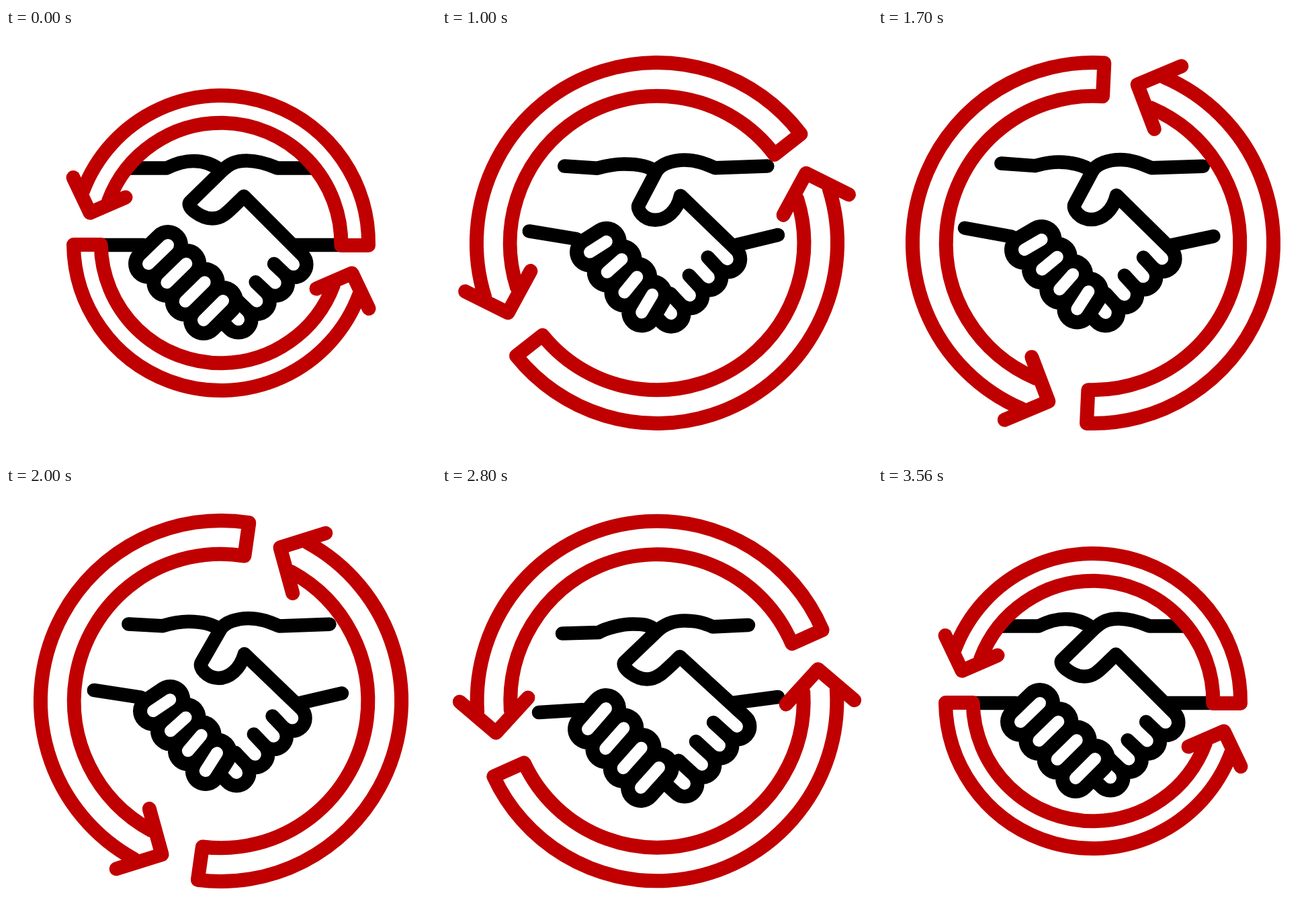
An HTML page with a canvas for the animation above (3.6 s loop, 640 by 640 pixels).

```html
<!DOCTYPE html>
<html lang="en">
<head>
<meta charset="utf-8">
<title>Handshake</title>
<style>
  html, body { margin: 0; width: 100%; height: 100%; overflow: hidden; background: #fff; }
  canvas { display: block; }
</style>
</head>
<body>
<canvas id="stage" width="640" height="640"></canvas>
<script>
const ctx = document.getElementById('stage').getContext('2d');
const LOOP = 3600, RED = '#c00000', RAD = Math.PI / 180;

// Each joint: resting, lifted and dropped position.
const leftHand = {
  leftCap:    [[182, 208.5], [184, 199], [179, 219.5]],
  leftBend:   [[239, 208.5], [235, 203], [233, 218]],
  leftTop:    [[279, 198], [268, 198], [284, 205.5]],
  cuffLeft:   [[141, 323], [128, 294], [144, 337]],
  wristLeft:  [[205, 323], [198, 308], [209, 333]],
  lowFirst:   [[212, 351], [217, 327], [217, 362]],
  lowLast:    [[294, 435], [296, 415], [296, 449]],
  highFirst:  [[241, 323], [243, 313], [244, 331]],
  highLast:   [[323, 406], [313, 389], [323, 419]]
};
const rightHand = {
  cross:      [[321, 213], [319, 213], [320, 216]],
  rightTop:   [[358, 197.5], [360, 195.5], [361, 200.5]],
  rightBend:  [[404, 208.5], [407, 208], [403, 209.5]],
  rightCap:   [[458, 208.5], [485, 206], [456, 207]],
  thumbSide:  [[274, 259], [293.5, 262], [272, 262]],
  thumbTip:   [[307, 283.5], [318, 284.5], [305, 287.5]],
  thumbCurve: [[330, 274], [350, 272], [330, 277]],
  knuckle:    [[354, 250.5], [355, 248.5], [354, 254]],
  tipFirst:   [[428, 352], [421, 342], [439, 358]],
  tipLast:    [[346, 434], [336, 422], [361, 443]],
  gap:        [[399, 351], [394, 341], [404, 352]],
  wristRight: [[430, 323], [433, 324], [432, 323]],
  cuffRight:  [[497, 323], [499, 311], [500, 314]]
};

// Keys are [time, value]; spin and grow run forwards, then mirrored.
const spin = [[120, 0], [500, 7.4], [660, 14.4], [800, 24.2], [1000, 38], [1380, 66.5], [1600, 82], [1800, 90]];
const grow = [[120, 0], [340, .12], [500, .5], [660, .88], [860, 1]];
const lift = [[120, 0], [500, .5], [1000, 1], [1380, 1], [2000, .9], [2800, 0]];
const dropLeft = [[120, 0], [1000, .6], [1380, 0], [2000, .5], [2800, 1], [3500, 0]];
const dropRight = [[120, 0], [1000, .33], [1380, 0], [2000, .4], [2800, 1], [3500, 0]];

// Smooth interpolation that never overshoots its keys.
function track(keys, t) {
  const last = keys.length - 1;
  if (t <= keys[0][0]) return keys[0][1];
  if (t >= keys[last][0]) return keys[last][1];
  const slope = i => (keys[i + 1][1] - keys[i][1]) / (keys[i + 1][0] - keys[i][0]);
  const tangent = i => {
    if (i === 0 || i === last) return 0;
    const a = slope(i - 1), b = slope(i);
    return a * b > 0 ? 2 * a * b / (a + b) : 0;
  };
  const i = keys.findIndex(k => k[0] > t) - 1;
  const span = keys[i + 1][0] - keys[i][0], u = (t - keys[i][0]) / span, v = 1 - u;
  return keys[i][1] * v * v * (1 + 2 * u) + keys[i + 1][1] * u * u * (3 - 2 * u)
    + span * u * v * (tangent(i) * v - tangent(i + 1) * u);
}

const mix = (a, b, k) => [a[0] + (b[0] - a[0]) * k, a[1] + (b[1] - a[1]) * k];
const shift = (p, x, y) => [p[0] + x, p[1] + y];
const curve = (a, b, c) => ctx.bezierCurveTo(...a, ...b, ...c);

function stroke(color, width, draw) {
  ctx.strokeStyle = color;
  ctx.lineWidth = width;
  ctx.beginPath();
  draw();
  ctx.stroke();
}

function line(...points) {
  points.forEach((p, i) => i ? ctx.lineTo(...p) : ctx.moveTo(...p));
}

function pose(joints, up, down) {
  const blend = ([rest, high, low]) =>
    rest.map((v, i) => v + (high[i] - v) * up + (low[i] - v) * down);
  return Object.fromEntries(Object.entries(joints).map(([name, places]) => [name, blend(places)]));
}

function drawHands(t) {
  const up = track(lift, t);
  const p = {
    ...pose(leftHand, up, track(dropLeft, t)),
    ...pose(rightHand, up, track(dropRight, t))
  };
  const step = [(p.tipLast[0] - p.tipFirst[0]) / 3, (p.tipLast[1] - p.tipFirst[1]) / 3];
  const along = (point, n) => shift(point, step[0] * n, step[1] * n);

  stroke('#000', 20.5, () => {
    line(p.leftCap, p.leftBend);
    curve(shift(p.leftBend, 12, (p.leftTop[1] - p.leftBend[1]) * .55), shift(p.leftTop, -16, 0), p.leftTop);
    curve(shift(p.leftTop, 16, 0), shift(p.cross, -12, -10), p.cross);

    line(p.rightCap, p.rightBend);
    curve(shift(p.rightBend, -14, -6), shift(p.rightTop, 18, 0), p.rightTop);
    curve(shift(p.rightTop, -16, 0), mix(p.thumbSide, p.cross, 1.25), p.cross);
    ctx.lineTo(...p.thumbSide);
    curve(mix(p.cross, p.thumbSide, 1.15), shift(p.thumbTip, -17, 0), p.thumbTip);
    curve(shift(p.thumbTip, 16, 0), p.thumbCurve, p.knuckle);

    const start = Math.atan2(-step[1], -step[0]);
    for (let i = 0; i < 4; i++) {
      ctx.arc(...along(p.tipFirst, i), Math.hypot(...step) / 2, start, start + Math.PI);
    }
    ctx.lineTo(...along(p.gap, 3));
    for (let i = 0; i < 3; i++) line(along(p.tipFirst, i + .5), along(p.gap, i));

    line(p.wristRight, p.cuffRight);
    line(p.cuffLeft, p.wristLeft);
  });

  const fingers = () => {
    for (let i = 0; i < 4; i++) {
      line(mix(p.lowFirst, p.lowLast, i / 3), mix(p.highFirst, p.highLast, i / 3));
    }
  };
  stroke('#000', 60, fingers);
  stroke('#fff', 18, fingers);
}

function drawArrow(turn, scale, endY) {
  const outer = 219.5, inner = 178.8, head = 200.5 * RAD;
  const end = r => 2 * Math.PI + Math.asin(endY / r);
  const at = (x, y) => [x * scale, y * scale];
  ctx.save();
  ctx.translate(320, 320);
  ctx.rotate(turn * RAD);
  stroke(RED, 21, () => {
    ctx.arc(0, 0, outer * scale, head, end(outer));
    ctx.arc(0, 0, inner * scale, end(inner), head, true);
    line(at(-220, -97.5), at(-195, -45), at(-142, -68));
  });
  ctx.restore();
}

function frame(now) {
  const t = now % LOOP, mirrored = Math.min(t, LOOP - t);
  const turn = -track(spin, mirrored), scale = 1 + .2235 * track(grow, mirrored);
  ctx.fillStyle = '#fff';
  ctx.fillRect(0, 0, 640, 640);
  drawHands(t);
  drawArrow(turn, scale, 3.5);
  drawArrow(turn + 180, scale, -2.5);
}

ctx.lineCap = ctx.lineJoin = 'round';
const begin = performance.now();
requestAnimationFrame(function tick(now) {
  frame(Math.max(0, now - begin));
  requestAnimationFrame(tick);
});
</script>
</body>
</html>
```
